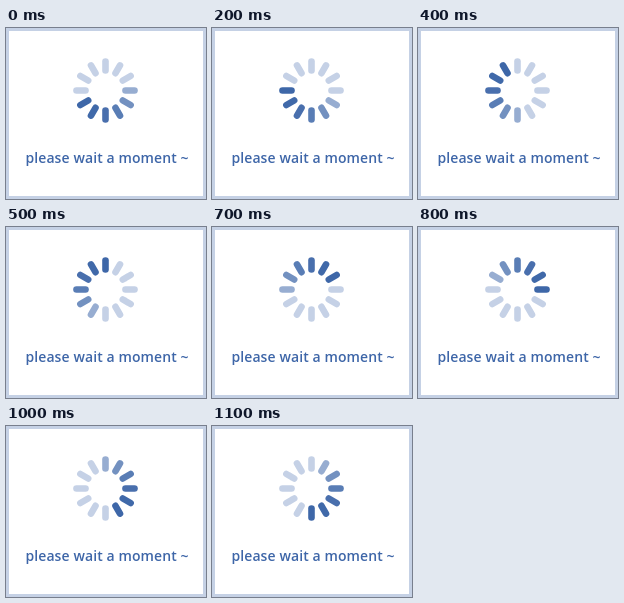
An HTML page that plays this animation: 200x171 px, repeating every 1.2 s.

```html
<!DOCTYPE html>
<html lang="en">
<head>
<meta charset="utf-8">
<title>Please wait</title>
<style>
  html, body { margin: 0; width: 100%; height: 100%; overflow: hidden; background: #fff; }
  svg { display: block; width: 200px; height: 171px; }
  text { font: 600 14px "Open Sans", "Noto Sans", sans-serif; letter-spacing: .1px; fill: #3e66a8; }
</style>
</head>
<body>
<svg viewBox="0 0 200 171">
  <rect x="1.5" y="1.5" width="197" height="168" fill="#fff" stroke="#c5d1e5" stroke-width="3"/>
  <g id="spinner" transform="translate(99.5 62.5)" stroke-width="6.6" stroke-linecap="round"></g>
  <text x="19.4" y="135">please wait a moment ~</text>
</svg>
<script>
  const SPOKES = 12, STEP = 100, LOOP = 1200, TAIL = 6;
  const DARK = [62, 103, 168], LIGHT = [197, 209, 230];
  const spinner = document.getElementById('spinner');

  const spokes = Array.from({ length: SPOKES }, (_, i) => {
    const line = document.createElementNS('http://www.w3.org/2000/svg', 'line');
    line.setAttribute('y1', -29);
    line.setAttribute('y2', -20);
    line.setAttribute('transform', `rotate(${i * 360 / SPOKES})`);
    return spinner.appendChild(line);
  });

  function shade(age) {
    const k = Math.min(1, (age / TAIL) ** 2.3);
    return `rgb(${DARK.map((c, i) => Math.round(c + (LIGHT[i] - c) * k))})`;
  }

  function draw(now) {
    // The first pose holds for two steps, so the head skips one spoke per loop.
    const step = Math.max(1, Math.floor(now % LOOP / STEP));
    const head = (step + 7) % SPOKES;
    spokes.forEach((spoke, i) =>
      spoke.setAttribute('stroke', shade((head - i + SPOKES) % SPOKES)));
    requestAnimationFrame(draw);
  }
  draw(performance.now());
</script>
</body>
</html>
```
